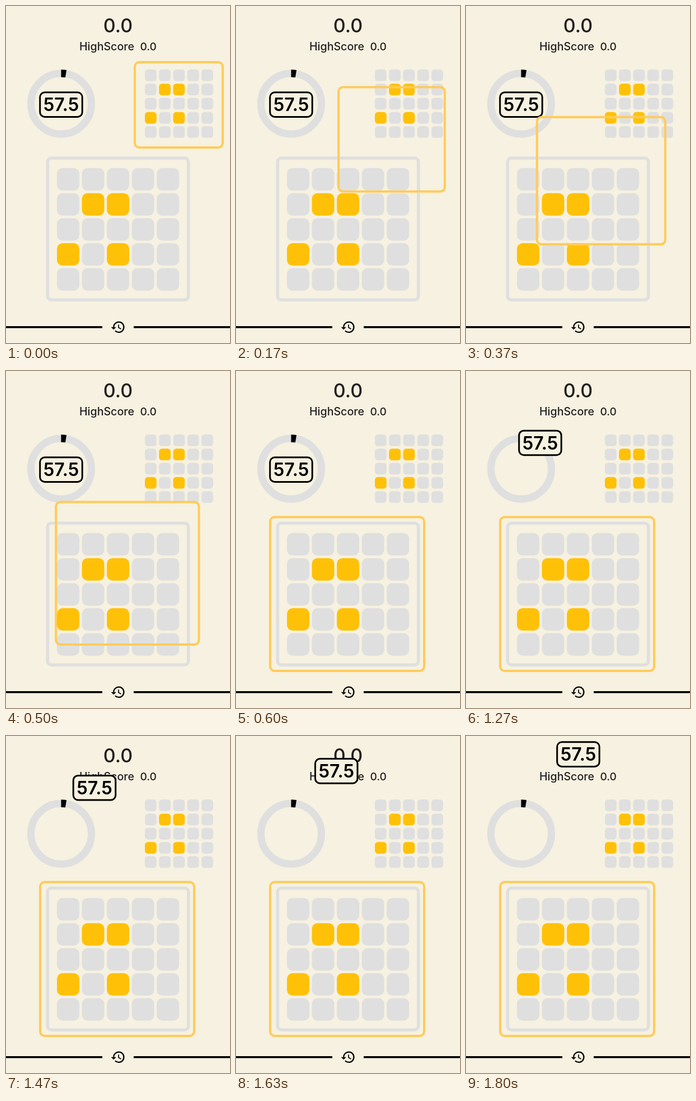
Write an HTML page that moves like this. It is 400 by 600 pixels and loops after 2.06 s.

```html
<!DOCTYPE html>
<html lang="en">
<head>
<meta charset="utf-8">
<style>
  html, body { margin: 0; width: 100%; height: 100%; overflow: hidden; background: #f6f1e0; }
  svg { display: block; width: 100%; height: 100%; }
  text { font-family: Inter, sans-serif; font-weight: 500; fill: #231f20; }
  .line { fill: none; stroke: #000; }
  .pale { fill: none; stroke: #dfdfdf; }
</style>
</head>
<body>
<svg viewBox="0 0 400 600">
  <text x="200" y="47" font-size="34" text-anchor="middle">0.0</text>
  <text x="131" y="78.5" font-size="19.6">HighScore</text>
  <text x="269" y="78.5" font-size="19.2" text-anchor="end">0.0</text>

  <circle class="pale" cx="98.5" cy="174" r="54" stroke-width="13"/>
  <path class="line" d="M98.4 120a54 54 0 0 1 8.6.7" stroke-width="13.4"/>

  <rect class="pale" x="74.2" y="270.8" width="251.6" height="252.4" rx="7" stroke-width="5.5"/>
  <g id="cells"></g>

  <path class="line" d="M0 571.8H172M228 571.8H400" stroke-width="3.6"/>
  <g transform="translate(186.5 558.1) scale(1.14)">
    <path class="line" d="M5 12a8 8 0 1 1 2.35 5.65" stroke-width="2"/>
    <path class="line" d="M12.75 8v4.6l3.9 2.3" stroke-width="1.5"/>
    <path d="M1 12h8l-4 4z"/>
  </g>

  <g id="timer">
    <rect x="60.7" y="153.8" width="75.5" height="43.6" rx="8.5" fill="#f6f1e0" stroke="#000" stroke-width="3"/>
    <text x="98.5" y="187.4" font-size="32" text-anchor="middle" style="font-weight:600;fill:#000">57.5</text>
  </g>
  <rect id="focus" rx="8" fill="none" stroke="#ffcb5a" stroke-width="4"/>
</svg>
<script>
const $ = id => document.getElementById(id);
const set = (el, attrs) => {
  for (const k in attrs) el.setAttribute(k, attrs[k]);
};

// Active cells, keyed by row and column
const active = ['1,1', '1,2', '3,0', '3,2'];

function grid(x, y, pitch, size, rx) {
  for (let r = 0; r < 5; r++) for (let c = 0; c < 5; c++) {
    const cell = document.createElementNS('http://www.w3.org/2000/svg', 'rect');
    set(cell, {
      x: x + c * pitch, y: y + r * pitch, width: size, height: size, rx,
      fill: active.includes(r + ',' + c) ? '#ffc107' : '#dfdfdf'
    });
    $('cells').append(cell);
  }
}
grid(248, 113, 25.25, 20.8, 5.5);
grid(91, 288.6, 44.55, 40, 10);

const LOOP = 2060, STEP = 100 / 3;
const clamp = p => Math.max(0, Math.min(1, p));
const mix = (a, b, p) => a + (b - a) * p;

function draw(now) {
  const step = Math.floor((now % LOOP + 3.5) / STEP);
  const p = clamp(step / 18);
  const q = clamp((step - 30) / 24);
  set($('focus'), {
    x: mix(230, 61, p), y: mix(100, 260, p),
    width: mix(157, 275, p), height: mix(152, 274, p)
  });
  set($('timer'), { transform: `translate(${102 * q} ${-143 * q})` });
}

let start;
function tick(now) {
  start ??= now;
  draw(now - start);
  requestAnimationFrame(tick);
}
draw(0);
requestAnimationFrame(tick);
</script>
</body>
</html>
```
